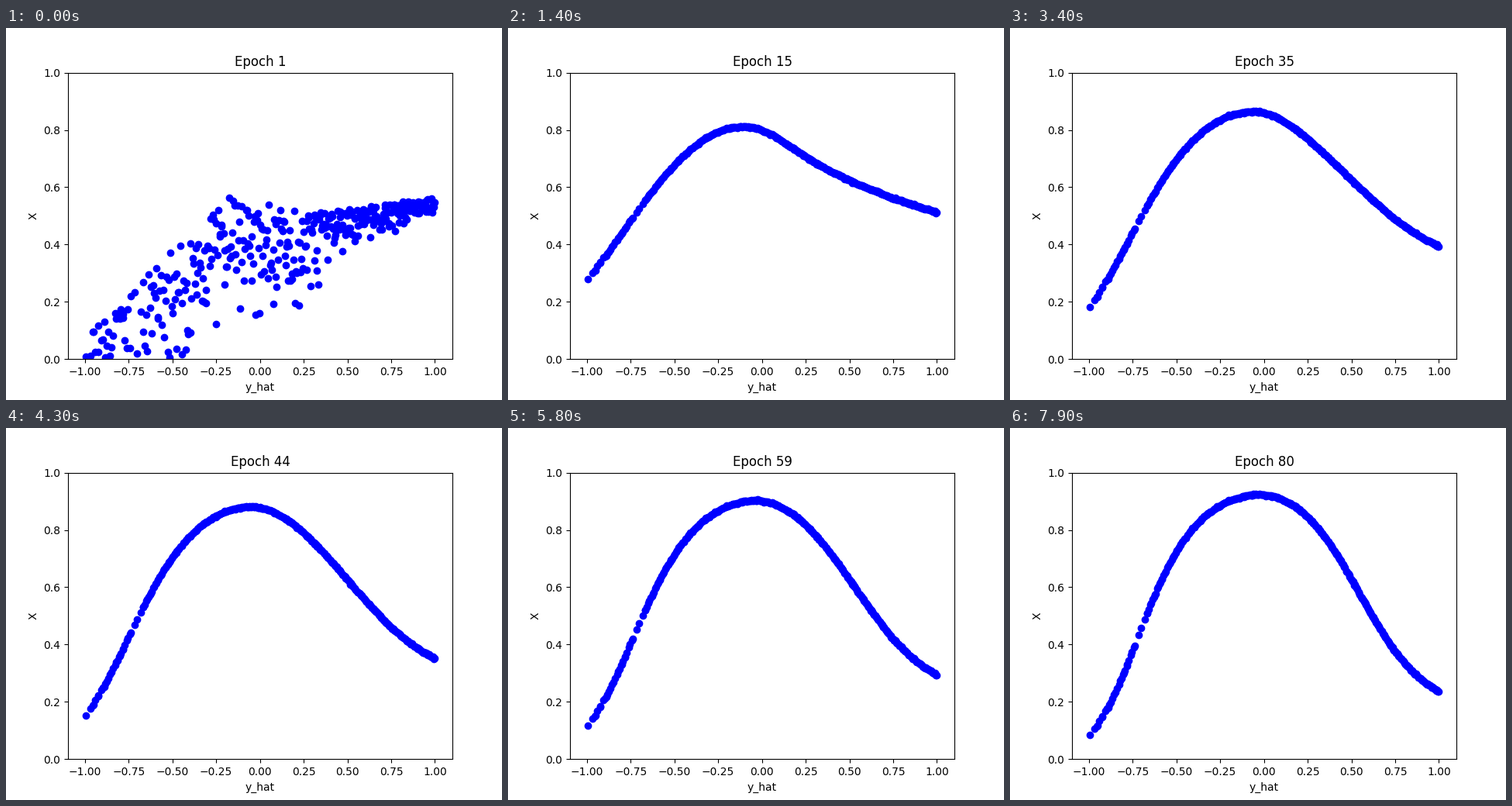
These frames come from a looping animation (640 px wide and 480 px high, 8 s). A matplotlib script:

```python
import numpy as np
import matplotlib.pyplot as plt
from matplotlib.animation import FuncAnimation

EPOCHS = 80
SAMPLES = 370
rng = np.random.default_rng(7)


def make_inputs():
    """Jittered inputs, thinner to the left, with a sparse gap near -0.7."""
    s = (np.arange(SAMPLES) + rng.random(SAMPLES)) / SAMPLES
    x = -.9964 + 1.9964 * s ** .8
    x[0], x[-1] = -.9964, 1
    x = x[(x < -.735) | (x > -.68)]
    return np.append(x, [-.715, -.70])


def ridge(x, d):
    return np.sqrt(x * x + d * d) - d


x = make_inputs()

# Bounds of the predictions during the first epoch
floor = np.interp(x, [0, .35, .4, .6, 1], [0, .2, .35, .39, .50])
ceiling = np.interp(x, [-1, -.25, -.1, .3, 1], [.07, .555, .57, .51, .565])

# Share of an epoch that has passed when each sample is seen
seen = rng.random(len(x)) ** np.where(x < -.3, 1, .45)
noise = rng.normal(0, .0015, len(x))

# Logits of the fitted curve, soon after the start and at the end
early = 1.175 - 1.69 * ridge(x, .2) + x * (.9 - .494 / (x * x + .2))
late = 2.47 - 5.29 * ridge(x, .22) + x * (1.415 * x * x - .8)


def progress(epoch):
    """0 at epoch 7, 1 at epoch 80, slowing down on the way."""
    return (1 - np.exp((7 - epoch) / 85)) / (1 - np.exp(-73 / 85))


def predict(epoch):
    if epoch == 1:
        return floor + (ceiling - floor) * seen
    logit = early + (late - early) * progress(epoch)
    fit = 1 / (1 + np.exp(-logit))
    unlearned = np.exp(-(epoch - 2 + seen) / 1.2)
    return fit + (ceiling - fit) * unlearned + noise


fig, ax = plt.subplots(figsize=(6.4, 4.8), dpi=100)
ax.set_xlim(-1.0962, 1.0998)
ax.set_ylim(0, 1)
ax.set_xlabel("y_hat")
ax.set_ylabel("X")
title = ax.set_title("Epoch 1")
dots = ax.scatter(x, predict(1), color="blue")


def update(i):
    dots.set_offsets(np.column_stack([x, predict(i + 1)]))
    title.set_text(f"Epoch {i + 1}")
    return dots, title


anim = FuncAnimation(fig, update, frames=EPOCHS, interval=100, repeat=True)
plt.show()
```
